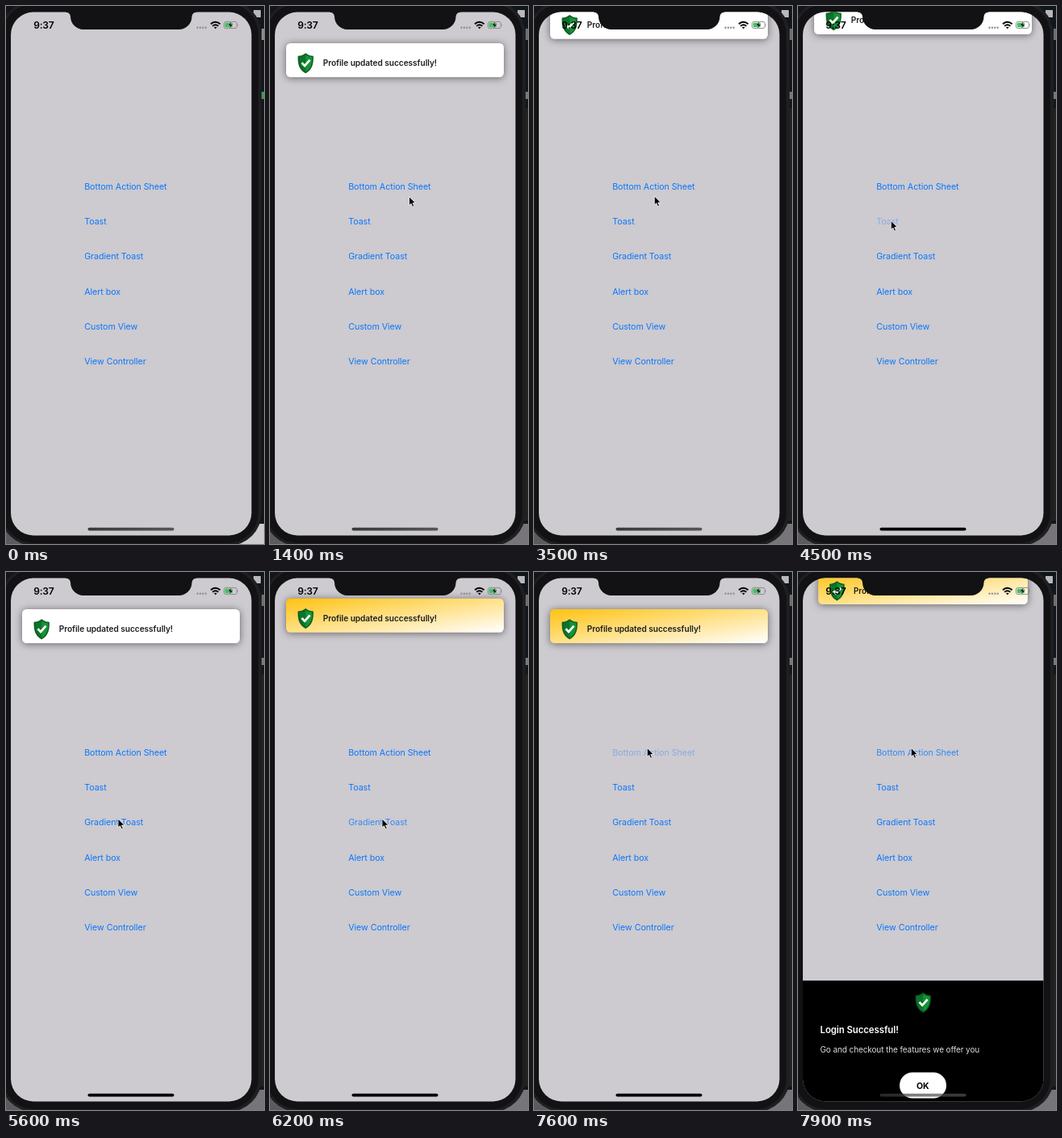
Animation of 320x665 px, one loop 8000 ms. Source, as an HTML page:

```html
<!DOCTYPE html>
<html lang="en">
<head>
<meta charset="utf-8">
<title>Toast demo</title>
<style>
  html, body { margin: 0; width: 100%; height: 100%; overflow: hidden; background: #101318; }
  svg { display: block; width: 320px; height: 665px; font-family: Inter, Roboto, sans-serif; }
  .label { font-size: 10.7px; letter-spacing: -.06px; fill: #0a78fb; }
  .toast { filter: drop-shadow(0 1px 5px rgba(0, 0, 0, .5)); }
  .msg { font-size: 10.1px; font-weight: 600; letter-spacing: -.03px; fill: #1d1c20; }
  .title { font-size: 11.4px; font-weight: 600; letter-spacing: -.06px; fill: #fff; }
  .body { font-size: 10px; letter-spacing: -.1px; fill: #dcdcdc; }
  .ok { font-size: 10.5px; font-weight: 700; text-anchor: middle; }
  .clock { font-size: 12px; font-weight: 600; letter-spacing: -.2px; }
</style>
</head>
<body>
<svg viewBox="0 0 320 665">
  <defs>
    <clipPath id="screen"><rect x="6" y="7.5" width="298.5" height="647" rx="28"/></clipPath>
    <linearGradient id="gold" x1="0" y1="0" x2="1" y2="1">
      <stop stop-color="#ffc210"/><stop offset="1" stop-color="#fff"/>
    </linearGradient>
    <linearGradient id="bar">
      <stop stop-color="#39383b"/><stop offset="1" stop-color="#565457"/>
    </linearGradient>
    <g id="shield">
      <path d="M0-12.5C3-10 6-9 9.6-9C10 1 8 8.500 0 12.500C-8 8.500-10 1-9.600-9C-6-9-3-10 0-12.500Z" fill="#0b5a20"/>
      <path d="M0-10.800C-3-8.500-5-8-8.200-7.600C-8.300 1-6.500 7.200 0 10.800Z" fill="#0c7428"/>
      <path d="M0-10.800C3-8.500 5-8 8.200-7.600C8.300 1 6.500 7.200 0 10.800Z" fill="#169339"/>
      <path d="M-4.800-.6L-1.200 3.300L5.300-4" fill="none" stroke="#fff" stroke-width="2.700"/>
    </g>
  </defs>

  <!-- desktop behind the phone -->
  <rect width="320" height="665" fill="#11161d"/>
  <rect x="316" y="126" width="4" height="510" fill="#23211f"/>
  <path d="M0 610H30V665H0Z" fill="#5c5a5e"/>
  <path d="M270 640H320V665H270Z" fill="#77757a"/>
  <rect x="307" y="5" width="9" height="9" fill="#b9b7ba"/>
  <rect x="317" y="28" width="3" height="14" fill="#6d6d70"/>
  <rect x="317" y="106" width="3" height="9" fill="#77787a"/>
  <g id="early">
    <rect x="316" y="126" width="4" height="510" fill="#151313"/>
    <rect x="317" y="28" width="3" height="14" fill="#8b8a8d"/>
    <rect x="317" y="106" width="3" height="9" fill="#3f9a55"/>
    <path d="M270 640H320V665H270Z" fill="#cfccd0"/>
  </g>

  <!-- phone -->
  <rect x="-7" y="-6" width="324" height="673" rx="41" fill="#1f1e21"/>
  <rect x="-4" y="-3" width="317" height="667" rx="38" fill="#121113"/>
  <g clip-path="url(#screen)">
    <rect x="5" y="6" width="301" height="650" fill="#cdcad0"/>
    <g id="labels"></g>
    <g id="toasts"></g>
    <g id="sheet">
      <rect x="5" y="505" width="301" height="260" fill="#000"/>
      <use href="#shield" x="155.300" y="532.300"/>
      <text class="title" x="27.500" y="570">Login Successful!</text>
      <text class="body" x="27.500" y="594.300">Go and checkout the features we offer you</text>
      <rect x="126" y="618.500" width="58" height="32" rx="16" fill="#fff"/>
      <text class="ok" x="154.800" y="638.600">OK</text>
    </g>
  </g>

  <!-- status bar -->
  <text class="clock" x="34.200" y="28">9:37</text>
  <path d="M237.500 26.700H248" stroke="#918f94" stroke-width="2.400" stroke-linecap="round" stroke-dasharray="0 3.400"/>
  <g fill="none" stroke="#000" stroke-width="1.900">
    <path d="M254 22.200Q259.800 17.200 265.600 22.200"/>
    <path d="M256.200 24.700Q259.800 21.700 263.400 24.700"/>
  </g>
  <path d="M257.900 26.300Q259.800 25 261.700 26.300L259.800 28.300Z"/>
  <rect x="270.400" y="19.400" width="16" height="8.200" rx="2.400" fill="none" stroke="#85838a" stroke-width=".9"/>
  <path d="M287.500 22V25Q288.900 23.500 287.500 22Z" fill="#85838a"/>
  <rect x="271.700" y="20.700" width="9.300" height="5.600" rx="1.200" fill="#35c759"/>
  <path d="M279.700 19L275.300 24H278L276.900 28L281.500 22.700H278.700Z" stroke="#cdcad0" stroke-width=".5"/>
  <path d="M74 6V7.500A6 6 0 0 1 80 13A16 16 0 0 0 96 29H214.500A16 16 0 0 0 230.500 13A6 6 0 0 1 236.500 7.500V6Z" fill="#121113"/>
  <rect id="home" x="101.500" y="644.700" width="107" height="3.800" rx="1.900"/>
  <path id="cursor" d="M0 0V11L2.500 8.700L4.200 12.700L6.200 11.900L4.500 8H8Z" fill="#000" stroke="#fff" stroke-width=".8" stroke-linejoin="round"/>
</svg>
<script>
const LOOP = 8000, STEP = 100;
const SHEET_AT = 7700;
const $ = id => document.getElementById(id);
const clamp = v => Math.min(1, Math.max(0, v));
const smooth = k => k * k * (3 - 2 * k);
const progress = (t, from, to) => clamp((t - from) / (to - from));
const show = (el, on) => el.setAttribute("visibility", on ? "visible" : "hidden");

const names = ["Bottom Action Sheet", "Toast", "Gradient Toast", "Alert box", "Custom View", "View Controller"];
$("labels").innerHTML = names.map((name, i) =>
  `<text class="label" x="97.200" y="${(226.8 + i * 43.3).toFixed(1)}">${name}</text>`).join("");
const labels = [...$("labels").children];

const toasts = [
  { enter: 1200, leave: 3400, drop: 0, shrink: 0, fill: "#fff" },
  { enter: 4500, leave: 6000, drop: 53, shrink: .0008, fill: "#fff" },
  { enter: 6100, leave: 7800, drop: 53, shrink: .0008, fill: "url(#gold)" }
];
$("toasts").innerHTML = toasts.map(({ fill }) => `<g class="toast">
  <rect x="20" y="46" width="270" height="42" rx="5.500" fill="${fill}"/>
  <use href="#shield" x="44.200" y="70.700"/>
  <text class="msg" x="65.700" y="74.200">Profile updated successfully!</text></g>`).join("");
toasts.forEach((toast, i) => toast.el = $("toasts").children[i]);

const presses = [
  { label: "Toast", down: 700, up: 800 },
  { label: "Toast", down: 4300, up: 4500 },
  { label: "Gradient Toast", down: 5900, up: 6000 },
  { label: "Bottom Action Sheet", down: 7600, up: 7700 }
];

const home = { x: 190, y: 383 };
const moves = [
  { from: 200, to: 500, x: 131, y: 257 },
  { from: 500, to: 700, x: 116, y: 265 },
  { from: 1000, to: 1400, x: 172.5, y: 235.5 },
  { from: 1900, to: 2400, x: 152, y: 232.5 },
  { from: 3400, to: 4000, x: 115.3, y: 265.5 },
  { from: 4700, to: 5300, x: 157, y: 300 },
  { from: 5300, to: 5600, x: 139, y: 305 },
  { from: 6800, to: 7300, x: 140.3, y: 217.5 }
];

function drawCursor(t) {
  let { x, y } = home;
  for (const m of moves) {
    const k = smooth(progress(t, m.from, m.to));
    x += (m.x - x) * k;
    y += (m.y - y) * k;
  }
  show($("cursor"), t >= 200);
  $("cursor").setAttribute("transform", `translate(${x} ${y})`);
}

// A toast settles exponentially and leaves with constant acceleration.
function drawToast({ el, enter, leave, drop, shrink }, t) {
  const age = (t - enter) / 100, gone = Math.max(0, (t - leave) / 100 + 1);
  const rise = 11.8 * gone ** 2;
  const y = 67 - drop * .25 ** age - rise;
  show(el, t >= enter && rise < 100);
  el.setAttribute("transform", `translate(155 ${y}) scale(${1 - rise * shrink}) translate(-155 -67)`);
}

function labelOpacity(name, t) {
  const press = presses.findLast(p => p.label === name && t >= p.down);
  return press ? .35 + .65 * progress(t, press.up, press.up + 300) : 1;
}

function draw(t) {
  show($("early"), t < 700);
  drawCursor(t);
  toasts.forEach(toast => drawToast(toast, t));
  labels.forEach((el, i) => el.setAttribute("opacity", labelOpacity(names[i], t)));

  const sheetUp = t > SHEET_AT;
  show($("sheet"), sheetUp);
  const hidden = 160 * (1 - progress(t, SHEET_AT, SHEET_AT + 200)) ** 2;
  $("sheet").setAttribute("transform", `translate(0 ${hidden})`);

  $("home").setAttribute("fill", t >= 3700 && !sheetUp ? "#000" : "url(#bar)");
  $("home").setAttribute("opacity", sheetUp ? .7 : 1);
}

const start = performance.now();
function tick() {
  const t = (performance.now() - start) % LOOP;
  draw(Math.floor(t / STEP) * STEP);
  requestAnimationFrame(tick);
}
tick();
</script>
</body>
</html>
```
